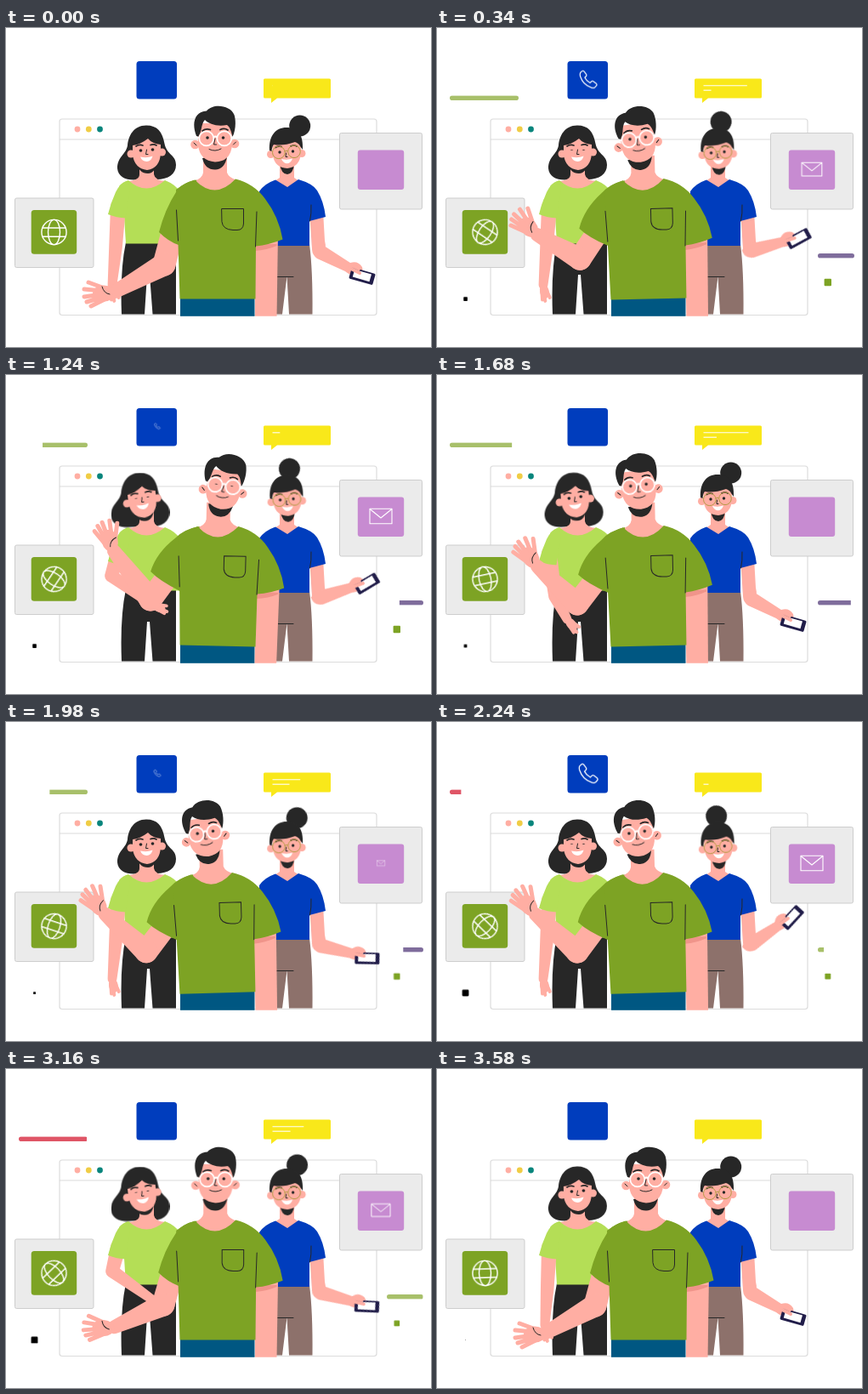
An HTML page for the animation above (3600 ms loop, 500 px wide and 375 px high).

```html
<!DOCTYPE html>
<html lang="en">
<head>
<meta charset="utf-8">
<title>Team online</title>
<style>
html, body { margin: 0; width: 100%; height: 100%; overflow: hidden; background: #fff; }
svg { display: block; width: 500px; height: 375px; }
.skin { fill: #ffaea3; }
.dark { fill: #272727; }
.ink { fill: none; stroke: #272727; stroke-width: 1; stroke-linecap: round; }
.thick { stroke-width: 1.7; }
.white { fill: none; stroke: #fff; stroke-width: 1.4; stroke-linejoin: round; }
.finger { fill: none; stroke: #ffaea3; stroke-width: 5; stroke-linecap: round; }
.small { stroke-width: 4; }

#globe { transform-origin: 56.5px 240px; animation: spin 3.6s linear infinite; }
#call { transform-origin: 178px 60px; animation: call 1.8s ease-in-out infinite; }
#mail { transform-origin: 441px 166px; animation: mail 1.8s ease-in-out infinite; }
.text { stroke-dasharray: 1 2; stroke-width: 1.1; }
#text1 { animation: text1 1.2s ease-in-out infinite; }
#text2 { animation: text2 1.2s linear infinite; }
.bar { stroke-width: 6; stroke-dasharray: 1 2; }
#bar1 { animation: sweep .72s cubic-bezier(.37,0,.63,1) infinite, tint1 3.6s step-end infinite; }
#bar2 { animation: sweep .72s cubic-bezier(.37,0,.63,1) infinite, tint2 3.6s step-end infinite; }
#dot1 { transform-origin: 33.5px 318.5px; animation: dot1 .9s linear infinite; }
#dot2 { transform-origin: 459.8px 299px; animation: dot2 .9s linear infinite; }
.nod { transform-origin: 167px 172px; animation: nod 1.8s ease-in-out infinite; }
#bobHair { --tilt: translate(-7.5px, .5px) rotate(0deg); }
#bobFace { --tilt: translate(-2px, .5px) rotate(-7deg); }
.sway { animation: sway 1.8s cubic-bezier(.37,0,.63,1) infinite; }
#bunHead { --turn: translate(1.5px, 1.2px) rotate(-2deg); transform-origin: 331px 160px; }
#bun { --turn: translate(0, 0) rotate(-60deg); transform-origin: 331px 132px; }
#phoneArm { --turn: translate(0, 0) rotate(-82deg); transform-origin: 368px 262px; }
.eyes { transform-box: fill-box; transform-origin: center; }
#bobFace .eyes { animation: blink .9s linear infinite; }
#manHead .eyes { animation: wink 1.8s linear infinite; }

@keyframes spin { to { transform: rotate(360deg); } }
@keyframes call { 0%, 76.7%, 100% { transform: scale(0); } 24%, 56.7% { transform: scale(1); } }
@keyframes mail { 0%, 91%, 100% { transform: scale(0); } 24%, 70% { transform: scale(1); } }
@keyframes text1 { 0% { stroke-dashoffset: 1; animation-timing-function: ease-out; } 33%, 50% { stroke-dashoffset: 0; } 85%, 100% { stroke-dashoffset: 1; } }
@keyframes text2 { 0%, 12% { stroke-dashoffset: 1; } 52%, 62% { stroke-dashoffset: 0; } 96%, 100% { stroke-dashoffset: 1; } }
@keyframes sweep { 0% { stroke-dashoffset: 1; } 42%, 55.5% { stroke-dashoffset: 0; } 97.5%, 100% { stroke-dashoffset: -1; } }
@keyframes tint1 { 0% { stroke: #a8c06a; } 60%, 100% { stroke: #df5566; } }
@keyframes tint2 { 0% { stroke: #7f6d9c; } 60%, 100% { stroke: #a8c06a; } }
@keyframes dot1 { 0%, 100% { transform: scale(0); } 13% { transform: scale(.25); } 38% { transform: scale(.58); } 49% { transform: scale(.97); } 60% { transform: scale(1); } 78% { transform: scale(.88); } 87% { transform: scale(.45); } }
@keyframes dot2 { 0%, 86%, 100% { transform: scale(0); } 13% { transform: scale(.72); } 25%, 38% { transform: scale(1); } 49% { transform: scale(.82); } 78% { transform: scale(.28); } }
@keyframes nod { 0%, 25%, 100% { transform: translate(0, 0) rotate(0deg); } 56%, 88% { transform: var(--tilt); } }
@keyframes sway { 0%, 82%, 100% { transform: translate(0, 0) rotate(0deg); } 36%, 58% { transform: var(--turn); } }
@keyframes blink { 0%, 31%, 61%, 100% { transform: scaleY(1); } 36%, 56% { transform: scaleY(.25); } }
@keyframes wink { 0%, 63%, 75%, 100% { transform: scaleY(1); } 66%, 72% { transform: scaleY(.25); } }
</style>
</head>
<body>
<svg viewBox="0 0 500 375">
  <defs>
    <clipPath id="pill1"><rect x="15" y="79.5" width="81" height="5.6" rx="2.8"/></clipPath>
    <clipPath id="pill2"><rect x="448" y="264.9" width="43" height="5.6" rx="2.8"/></clipPath>
    <clipPath id="floor"><path d="M0 0H500V338.8H0Z"/></clipPath>
  </defs>

  <!-- window and cards -->
  <g fill="none" stroke="#dcdcdc" stroke-width="1.2">
    <rect x="63" y="107" width="373" height="230.5" rx="3"/>
    <path d="M63 131H436"/>
  </g>
  <circle cx="84" cy="119" r="3.4" fill="#ffaea3"/>
  <circle cx="97.3" cy="119" r="3.4" fill="#f0cd45"/>
  <circle cx="110.5" cy="119" r="3.4" fill="#08857c"/>
  <g fill="#ebebeb" stroke="#cdcdcd">
    <rect x="10.5" y="200" width="92.5" height="81.5" rx="2"/>
    <rect x="392.5" y="123.5" width="97" height="89.5" rx="2"/>
  </g>
  <rect x="29.7" y="214" width="53.5" height="51.7" rx="3.5" fill="#7da324"/>
  <rect x="413.8" y="143.5" width="54.4" height="46.5" rx="3" fill="#c78bd1"/>
  <rect x="153.5" y="39" width="47.5" height="44.5" rx="3.5" fill="#003dbd"/>
  <path d="M304.5 59.5H380.5Q382 59.5 382 61V81Q382 82.5 380.5 82.5H319L312 88V82.5H304.5Q303 82.5 303 81V61Q303 59.5 304.5 59.5Z" fill="#f9e81a"/>

  <g id="globe" class="white">
    <circle cx="56.5" cy="240" r="14.6"/>
    <ellipse cx="56.5" cy="240" rx="7" ry="14.6"/>
    <path d="M42.8 235H70.2M42.8 245.2H70.2"/>
  </g>
  <g id="call">
    <path class="white" transform="translate(16.5 5) scale(.9)" d="M168 52l2.5-2.3q1.5-1 3 .5l3 4q1 1.5-.3 3l-1.8 1.8q2.6 5 7.6 7.6l1.8-1.8q1.5-1.3 3-.3l4 3q1.5 1.5 .5 3l-2.3 2.5q-2 1.5-5 .5q-12-4-16-16q-1-3 0-5.5z"/>
  </g>
  <g id="mail" class="white" style="stroke-width:1.1">
    <rect x="428" y="157.3" width="26" height="17.4"/>
    <path d="M428 157.5L441 168L454 157.5"/>
  </g>
  <path id="text1" class="white text" pathLength="1" d="M313.5 67.8H366.5"/>
  <path id="text2" class="white text" pathLength="1" d="M313.5 73.2H335.5"/>

  <g clip-path="url(#pill1)"><path id="bar1" class="bar" pathLength="1" d="M15 82.3H96"/></g>
  <g clip-path="url(#pill2)"><path id="bar2" class="bar" pathLength="1" d="M448 267.7H491"/></g>
  <rect id="dot1" x="29.5" y="314.5" width="8" height="8" rx="1.2"/>
  <rect id="dot2" x="455.6" y="294.8" width="8.4" height="8.4" rx="1" fill="#7da324"/>

  <!-- woman with the phone -->
  <g>
    <path fill="#8d716b" d="M298 254H357Q361 285 360.5 336.5H333L330.5 292L325 336.5H312Z"/>
    <path class="ink" d="M318 292.5H338"/>
    <path class="skin" d="M357 215H373L375 250Q378 261 372 268Q364 271 360 260Z"/>
    <g id="phoneArm" class="sway">
      <path class="skin" d="M371 254L405 276Q414 273 419 281Q421 289 414 290Q406 292 399 286L366 271Q357 264 362 255Z"/>
      <g transform="rotate(16 419 291.5)">
        <rect x="404.6" y="284.9" width="29" height="13.6" rx="1.5" fill="#211d49"/>
        <rect x="408.5" y="286.6" width="20.5" height="9" fill="#fff"/>
      </g>
      <path class="finger small" d="M404 282L416 288M407 279L415 283"/>
    </g>
    <path class="skin" d="M322 160H339V176L345 180L331 190L316 180L322 176Z"/>
    <path fill="#003dbd" d="M317 178.5L331 187L344 178Q361 183 366 191Q374 204 376 222L357 227V256H298V192Q304 183 317 178.5Z"/>
    <path class="ink" d="M359 208Q359.5 218 357.5 227"/>
    <g id="bunHead" class="sway">
      <g id="bun" class="sway"><circle cx="345.7" cy="115" r="12.5" class="dark"/></g>
      <path class="dark" d="M322 160Q324 172 331 172Q338 171 339 160Z"/>
      <circle class="skin" cx="311.5" cy="148.5" r="4.5"/>
      <circle class="skin" cx="348" cy="147.5" r="4.5"/>
      <path class="skin" d="M313 135Q330 124 347 134V147Q346 163 331 165Q316 164 314 150Z"/>
      <path class="dark" d="M310 144C309 127 317 117 330 117C343 117 350 125 349 143L346 139Q345 136 340 134Q326 139 315 137Q313 139 312.5 145Z"/>
      <path class="ink thick" d="M317 140.5Q320 138.5 324 139.5M335 139Q339 137 342 139"/>
      <g class="dark"><circle cx="322" cy="146" r="1.7"/><circle cx="337.5" cy="145" r="1.7"/></g>
      <g fill="none" stroke="#b59a45">
        <circle cx="320.8" cy="146.3" r="7.3"/><circle cx="339" cy="145.3" r="7.3"/>
        <path d="M328 145Q330 143.5 331.7 145"/>
      </g>
      <path class="ink" d="M329.5 147L329 151.5H331"/>
      <path fill="#fff" d="M324 154Q331 155.5 337 153.5Q335 159.5 330 159.3Q326 158.5 324 154Z"/>
    </g>
  </g>

  <!-- woman with bobbed hair -->
  <g>
    <path class="dark" d="M141 252H200L200 336.5H172.5L169 290H166L163 336.5H136Q134 285 141 252Z"/>
    <path id="bobHair" class="dark nod" d="M165 114.5C150 114.5 144 127 143 138C141 149 131 151 131 165C132 176 143 180 157 178H174C190 179 200 172 200 161C200 149 189 149 186.5 136C184 122 178 114.5 165 114.5Z"/>
    <path class="skin" d="M143 180Q157 179 157 172V160H174V172Q175 179 188 180L166 193Z"/>
    <path fill="#b4de56" d="M144 179Q165 198 187 179Q200 184 206 194V253.5H141L139 222L133 186Q137 181 144 179Z"/>
    <path id="waistArm" class="skin"/>
    <g id="waistHand">
      <ellipse class="skin" cx="8" cy="0" rx="8.5" ry="5.4"/>
      <path class="finger small" d="M8 -3L16 -5M9 1L19 1M8 3L17 4"/>
    </g>
    <path fill="#b4de56" d="M144 179.5Q134 182 129 193Q123 206 120 219Q130 223 140.5 223.5L146 190Z"/>
    <g id="bobFace" class="nod">
      <path class="dark" d="M154 158Q156 171 167 171Q176 170.5 178 157Z"/>
      <circle class="skin" cx="147" cy="148" r="4.5"/>
      <circle class="skin" cx="183.5" cy="146" r="4.5"/>
      <path class="skin" d="M149 138Q158 137 167 130Q172 136 182 137V147Q181 165 166 167Q151 165 149 149Z"/>
      <path class="ink thick" d="M153 139Q157 136.5 161 138M170 137.5Q174 136 177 138"/>
      <g class="eyes dark"><ellipse cx="158.5" cy="144" rx="1.9" ry="1.7"/><ellipse cx="172.5" cy="143" rx="1.9" ry="1.7"/></g>
      <path class="ink" d="M165.5 143L164.5 148.5H167"/>
      <path fill="#fff" d="M158 151.5Q166 153.5 172.5 150.5Q171 157 165.5 157Q160 156.5 158 151.5Z"/>
    </g>
  </g>

  <!-- man -->
  <rect x="205" y="312" width="87.5" height="26.8" fill="#005782"/>
  <path id="upperArm" class="skin"/>
  <path id="foreArm" class="skin"/>
  <g id="waveHand">
    <ellipse class="skin" cx="13" cy="-2" rx="13" ry="9.5"/>
    <path class="finger" d="M12 4L31 11M15 1L36 3M15 -3L36 -6M13 -6L33 -12M10 -8L28 -17"/>
    <path class="ink" d="M6 -3Q13 -2 15 6"/>
  </g>
  <g clip-path="url(#floor)">
    <g id="manBody">
      <path class="skin" d="M293 240H320L318.5 342H293Z"/>
      <path fill="#f0948a" d="M293 254H318.5V256Q307 261 293 262Z"/>
      <path class="skin" d="M232 150H260V170Q262 176 272 179L247 197L221 180Q231 177 232 170Z"/>
      <path id="sleeve" fill="#7da324"/>
      <path fill="#7da324" d="M222 178.5Q246 203 270 177.5Q292 183 305 201Q321 222 325.5 248.5Q309 255 294 256.5L293.5 318.5H204.5L202.5 254L200 190Q210 182 222 178.5Z"/>
      <path class="ink" d="M200.5 214L202.5 250M295 216L293.5 257M254 212.5H279.5V230Q279 237.5 272 237.5H267Q255 237 254 228Z"/>
      <g id="manHead">
        <path class="dark" d="M231 153Q234 166.5 246 166.5Q257 166 260 152Z"/>
        <circle class="skin" cx="222.5" cy="137" r="5.3"/>
        <circle class="skin" cx="269" cy="136" r="5.3"/>
        <path class="ink" d="M221 135L224 138M270.5 134L267.5 137"/>
        <path class="skin" d="M226 112H266V138Q264 157 246 157.5Q228 156 226 138Z"/>
        <path class="dark" d="M224 127C218 112 222 98 236 97.5C244 88 264 91 268.5 102C271 110 270 121 266.5 128C265 122 264 117 260 114C248 116 239 113 234 108C229 113 231 122 226 128Z"/>
        <path class="ink thick" d="M231 121Q235 117.5 240.5 119.5M252 119.5Q257 117 261 120"/>
        <g class="eyes dark"><ellipse cx="237" cy="129" rx="1.8" ry="1.7"/><ellipse cx="255.5" cy="129" rx="1.8" ry="1.7"/></g>
        <g class="white" style="stroke-width:1.7">
          <circle cx="235.8" cy="129.8" r="8.5"/><circle cx="256.8" cy="129.8" r="8.5"/>
          <path d="M244 128.5Q246.3 126.5 248.5 128.5M227.5 129L224 128M265 129L268 128"/>
        </g>
        <path class="ink" d="M246 130L244.5 137H247.5M239 142.5Q246 146 253 142"/>
      </g>
    </g>
  </g>
</svg>
<script>
const $ = id => document.getElementById(id);
const LOOP = 3600;

// Smooth interpolation through rows of [time, ...values], without overshoot.
function track(rows) {
  const slope = (i, c) => (rows[i + 1][c] - rows[i][c]) / (rows[i + 1][0] - rows[i][0]);
  const tangent = (i, c) => {
    if (i === 0 || i === rows.length - 1) return 0;
    const a = slope(i - 1, c), b = slope(i, c);
    return a * b > 0 ? 2 * a * b / (a + b) : 0;
  };
  return t => {
    let i = 0;
    while (i < rows.length - 2 && t >= rows[i + 1][0]) i++;
    const span = rows[i + 1][0] - rows[i][0], u = (t - rows[i][0]) / span;
    const ease = u * u * (3 - 2 * u);
    return rows[i].slice(1).map((v, k) => {
      const c = k + 1;
      return v + (rows[i + 1][c] - v) * ease
        + span * u * (1 - u) * (tangent(i, c) * (1 - u) - tangent(i + 1, c) * u);
    });
  };
}

// Tapered limb with round ends.
function limb(ax, ay, ra, bx, by, rb) {
  const len = Math.hypot(bx - ax, by - ay);
  const nx = (ay - by) / len, ny = (bx - ax) / len;
  return `M${ax + nx * ra} ${ay + ny * ra}L${bx + nx * rb} ${by + ny * rb}` +
    `A${rb} ${rb} 0 0 0 ${bx - nx * rb} ${by - ny * rb}` +
    `L${ax - nx * ra} ${ay - ny * ra}A${ra} ${ra} 0 0 0 ${ax + nx * ra} ${ay + ny * ra}Z`;
}

const set = (id, name, value) => $(id).setAttribute(name, value);
const place = (id, x, y, turn) => set(id, 'transform', `translate(${x} ${y}) rotate(${turn})`);

const lean = track([[0, 0], [430, -1.1], [700, -.35], [1180, 1], [1240, 1], [1680, -.9],
  [1960, -1.15], [2240, -1.08], [2820, .92], [3230, 0], [LOOP, 0]]);
const raise = track([[0, 0], [430, 1], [2820, 1], [3230, 0], [LOOP, 0]]);

// elbow x, y, wrist x, y, hand angle
const wave = track([
  [0, 186, 278, 128, 310, 180],
  [450, 165, 270, 116, 226, 240],
  [700, 167, 270, 126, 215, 231],
  [1240, 170, 264, 127, 207, 257],
  [1680, 165, 269, 118, 225, 242],
  [2240, 165, 270, 116, 226, 240],
  [2820, 171, 267, 121, 224, 233],
  [3230, 186, 278, 128, 310, 180],
  [LOOP, 186, 278, 128, 310, 180]
]);
const waist = track([
  [0, 129, 258, 125, 302, 80],
  [450, 129, 258, 125, 302, 80],
  [700, 130, 260, 133, 302, 65],
  [1000, 124, 236, 172, 270, 22],
  [1300, 124, 236, 172, 270, 22],
  [1680, 139, 260, 153, 287, 50],
  [1800, 129, 258, 125, 302, 80]
]);

function draw(t) {
  const [n] = lean(t), [up] = raise(t);
  set('manBody', 'transform', `rotate(${1.4 * n} 249 320)`);
  set('manHead', 'transform', `rotate(${6.4 * n} 246 180)`);
  const x = 180 - 12 * up, y = 240 - 7 * up;
  set('sleeve', 'd', `M224 178.5Q206 182 ${200 - 4 * up} 193Q${x + 7 - up} ${y - 27 + up * 5} ${x} ${y}Q${x + 11} ${y + 11} 203 255L226 220Z`);

  const [ex, ey, wx, wy, turn] = wave(t);
  set('upperArm', 'd', limb(200, 224, 13, ex, ey, 13.5));
  set('foreArm', 'd', limb(ex, ey, 13.5, wx, wy, 8));
  place('waveHand', wx, wy, turn);

  const [kx, ky, hx, hy, bend] = waist(t % 1800);
  set('waistArm', 'd', limb(132, 210, 9, kx, ky, 7.8) + limb(kx, ky, 7.8, hx, hy, 5.4));
  place('waistHand', hx, hy, bend);
}

let start;
function tick(now) {
  start ??= now;
  draw((now - start) % LOOP);
  requestAnimationFrame(tick);
}
draw(0);
requestAnimationFrame(tick);
</script>
</body>
</html>
```
